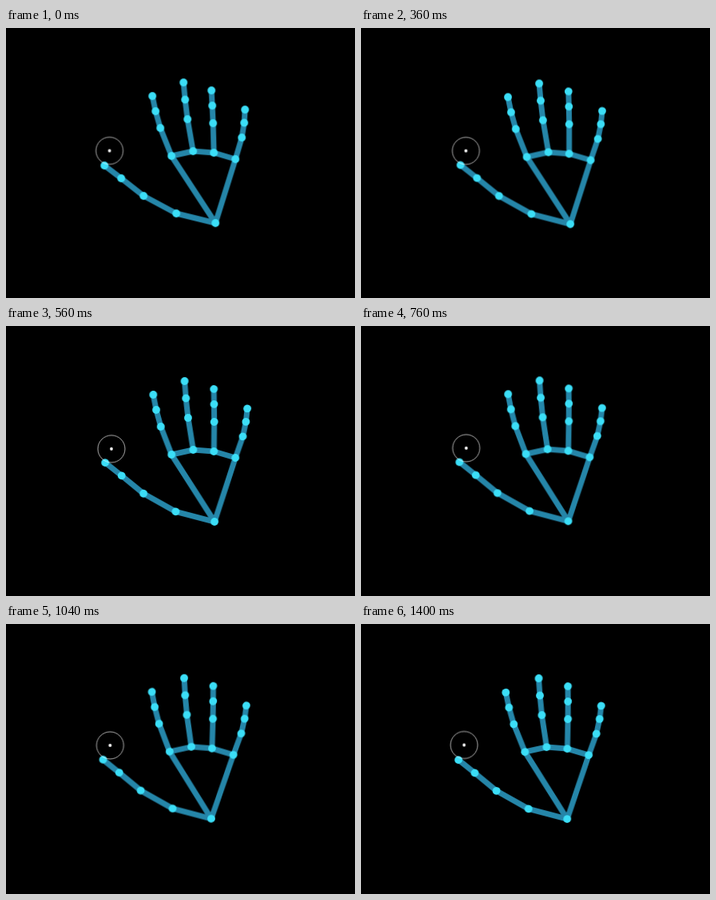
These frames come from a looping animation (437 px wide and 338 px high, 1440 ms). An HTML page without scripts:

```html
<!DOCTYPE html>
<html lang="en">
<head>
<meta charset="utf-8">
<title>Hand tracking</title>
<style>
  html, body { margin: 0; width: 100%; height: 100%; overflow: hidden; background: #000; }
  svg { display: block; width: 100%; height: 100%; }

  .hand {
    fill: none; stroke: #2586a9; stroke-width: 7; stroke-linejoin: round;
    transform-origin: 218px 70px;
    animation: sway 1.44s linear infinite;
  }
  .joints { marker: url(#joint); }

  /* each digit turns about its own root */
  .thumb  { --turn: .8deg;  transform-origin: 262px 244px; }
  .index  { --turn: -1.4deg; transform-origin: 207px 160px; }
  .ring   { --turn: 1.3deg; transform-origin: 260px 156px; }
  .little { --turn: 1.9deg; transform-origin: 287px 164px; }
  .thumb, .ring, .little { animation: spread-early 1.44s linear infinite; }
  .index { animation: spread-late 1.44s linear infinite; }

  .cursor { animation: drift 1.44s ease-in-out infinite; }

  /* the fingertips stay nearly still while the wrist swings to the left */
  @keyframes sway {
    0%       { transform: translate(0, 0) skewX(0deg); }
    11%      { transform: translate(.3px, 1px) skewX(-.4deg); }
    25%      { transform: translate(.8px, 1.3px) skewX(-.3deg); }
    39%      { transform: translate(1.3px, .8px) skewX(-.8deg); }
    64%      { transform: translate(1.2px, -.4px) skewX(-1.7deg); }
    83%      { transform: translate(0, -.6px) skewX(-2.3deg); }
    97%, to  { transform: translate(.2px, -.1px) skewX(-1.4deg); }
  }
  @keyframes spread-early {
    0%, 11% { rotate: 0deg; }
    25%, to { rotate: var(--turn); }
  }
  @keyframes spread-late {
    0%, 64% { rotate: 0deg; }
    83%, to { rotate: var(--turn); }
  }
  @keyframes drift {
    0%      { transform: translate(129.6px, 153.6px); }
    39%     { transform: translate(132px, 153.8px); }
    64%     { transform: translate(131.5px, 152.2px); }
    83%     { transform: translate(128.6px, 151.5px); }
    97%, to { transform: translate(129.1px, 151.5px); }
  }
</style>
</head>
<body>
<svg viewBox="0 0 437 338">
  <defs>
    <marker id="joint" markerUnits="userSpaceOnUse" markerWidth="12" markerHeight="12" refX="6" refY="6">
      <circle cx="6" cy="6" r="4.9" fill="#3bdef7"/>
    </marker>
  </defs>

  <g transform="translate(.3 .2)">
    <g class="hand">
      <path d="M262 244L207 160 234 154 260 156 287 164Z"/>
      <path class="joints thumb" d="M262 244L213 232 172 210 144 188 123 172"/>
      <path class="joints index" d="M207 160L193 125 187 104 183 85"/>
      <path class="joints" d="M234 154L227 114 224 89.5 222 68"/>
      <path class="joints ring" d="M260 156L259 119 258 97 257 78"/>
      <path class="joints little" d="M287 164L295 137 298 118.5 299 102"/>
    </g>
  </g>

  <g class="cursor">
    <circle r="17" fill="none" stroke="#fff" stroke-opacity=".75" stroke-width=".9"/>
    <circle r="1.9" fill="#fff"/>
  </g>
</svg>
</body>
</html>
```
